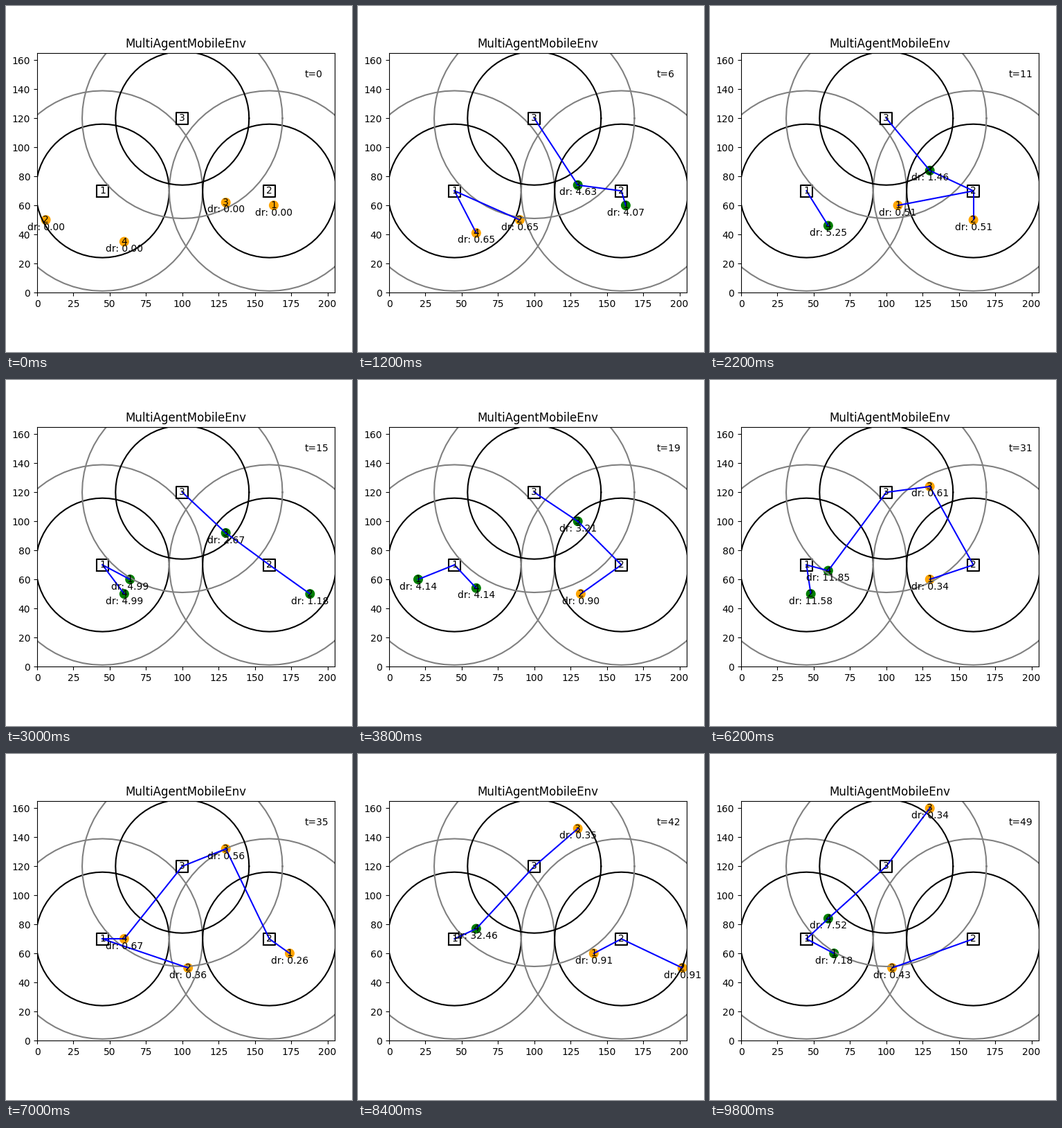
Write a matplotlib script that moves like this. It is 500 px wide and 500 px high and loops after 10000 ms.

```python
import numpy as np
import matplotlib.pyplot as plt
from matplotlib.animation import FuncAnimation

STEPS, INTERVAL = 50, 200
WIDTH, HEIGHT = 205, 165
STATIONS = np.array([(45, 70), (160, 70), (100, 120)], float)
STARTS = np.array([(163, 60), (6, 50), (130, 62), (60, 35)], float)
SPEEDS = np.array([(11, 0), (14, 0), (0, 2), (0, 1)], float)
MAX_LINKS = (1, 1, 3, 3)
SNR_MIN = 2e-8


def snr(dist, freq=2500, bs_height=50, ue_height=1.5, power=30, noise=1e-9):
    """Signal-to-noise ratio with Okumura-Hata path loss."""
    lf, lh = np.log10(freq), np.log10(bs_height)
    ch = 0.8 + (1.1 * lf - 0.7) * ue_height - 1.56 * lf
    loss = 69.55 + 26.16 * lf - 13.82 * lh - ch
    loss += (44.9 - 6.55 * lh) * np.log10(dist + 1e-16)
    return 10 ** ((power - loss) / 10) / noise


def move(pos, vel):
    """Take one step, turning round at the map border."""
    for p, v in zip(pos, vel):
        nxt = p + v
        if not (0 < nxt[0] < WIDTH and 0 < nxt[1] < HEIGHT):
            v *= -1
        p += v


def signal(pos):
    return snr(np.linalg.norm(pos[:, None] - STATIONS[None], axis=2))


def connect(links, sig):
    """Each user may add its strongest free station in range."""
    for u, limit in enumerate(MAX_LINKS):
        free = [b for b in range(len(STATIONS))
                if sig[u, b] > SNR_MIN and not links[u, b]]
        if free and links[u].sum() < limit:
            links[u, max(free, key=lambda b: sig[u, b])] = True


def data_rates(links, sig):
    """Users of one station all get the same rate."""
    full = 9e6 * np.log2(1 + sig)
    rates = np.zeros(len(links))
    for b in range(len(STATIONS)):
        on = links[:, b]
        if on.any():
            rates[on] += 1 / np.sum(1 / full[on, b])
    return rates


def simulate():
    pos, vel = STARTS.copy(), SPEEDS.copy()
    links = np.zeros((len(pos), len(STATIONS)), bool)
    states = []
    for _ in range(STEPS):
        sig = signal(pos)
        links &= sig > SNR_MIN
        states.append((pos.copy(), links.copy(), data_rates(links, sig)))
        connect(links, sig)
        move(pos, vel)
    return states


STATES = simulate()

fig = plt.figure(figsize=(5, 5), dpi=100)
scale = 430 / WIDTH
ax = fig.add_axes([0.09, 0.172, 0.86, HEIGHT * scale / 500])
ax.set_xlim(0, WIDTH)
ax.set_ylim(0, HEIGHT)
ax.set_xticks(range(0, 201, 25))
ax.set_yticks(range(0, 161, 20))
ax.set_title('MultiAgentMobileEnv')

centered = dict(ha='center', va='center')
angle = np.linspace(0, -2 * np.pi, 65)
for i, (x, y) in enumerate(STATIONS, 1):
    ax.plot(x + 4 * np.array([-1, 1, 1, -1, -1]),
            y + 4 * np.array([-1, -1, 1, 1, -1]), color='black')
    ax.text(x, y, str(i), **centered)
    for r, color in ((46, 'black'), (69, 'gray')):
        ax.plot(x + r * np.cos(angle), y + r * np.sin(angle), color=color)

clock = ax.text(0.9 * WIDTH, 0.9 * HEIGHT, '')
dots, ids, labels, wires = [], [], [], []
for u in range(len(STARTS)):
    dots.append(ax.add_patch(plt.Circle((0, 0), 3)))
    wires.append([ax.plot([], [], color='blue')[0] for _ in STATIONS])
    ids.append(ax.text(0, 0, str(u + 1), **centered))
    labels.append(ax.text(0, 0, '', **centered))


def draw(t):
    pos, links, rates = STATES[t]
    clock.set_text(f't={t}')
    for u, (x, y) in enumerate(pos):
        dots[u].center = (x, y)
        dots[u].set_color('green' if rates[u] >= 1 else 'orange')
        ids[u].set_position((x, y))
        labels[u].set_position((x, y - 5))
        labels[u].set_text(f'dr: {rates[u]:.2f}')
        for b, (bx, by) in enumerate(STATIONS):
            wires[u][b].set_data([x, bx], [y, by])
            wires[u][b].set_visible(bool(links[u, b]))
    return []


anim = FuncAnimation(fig, draw, frames=STEPS, interval=INTERVAL,
                     init_func=lambda: draw(0), repeat=True, repeat_delay=0)
plt.show()
```
